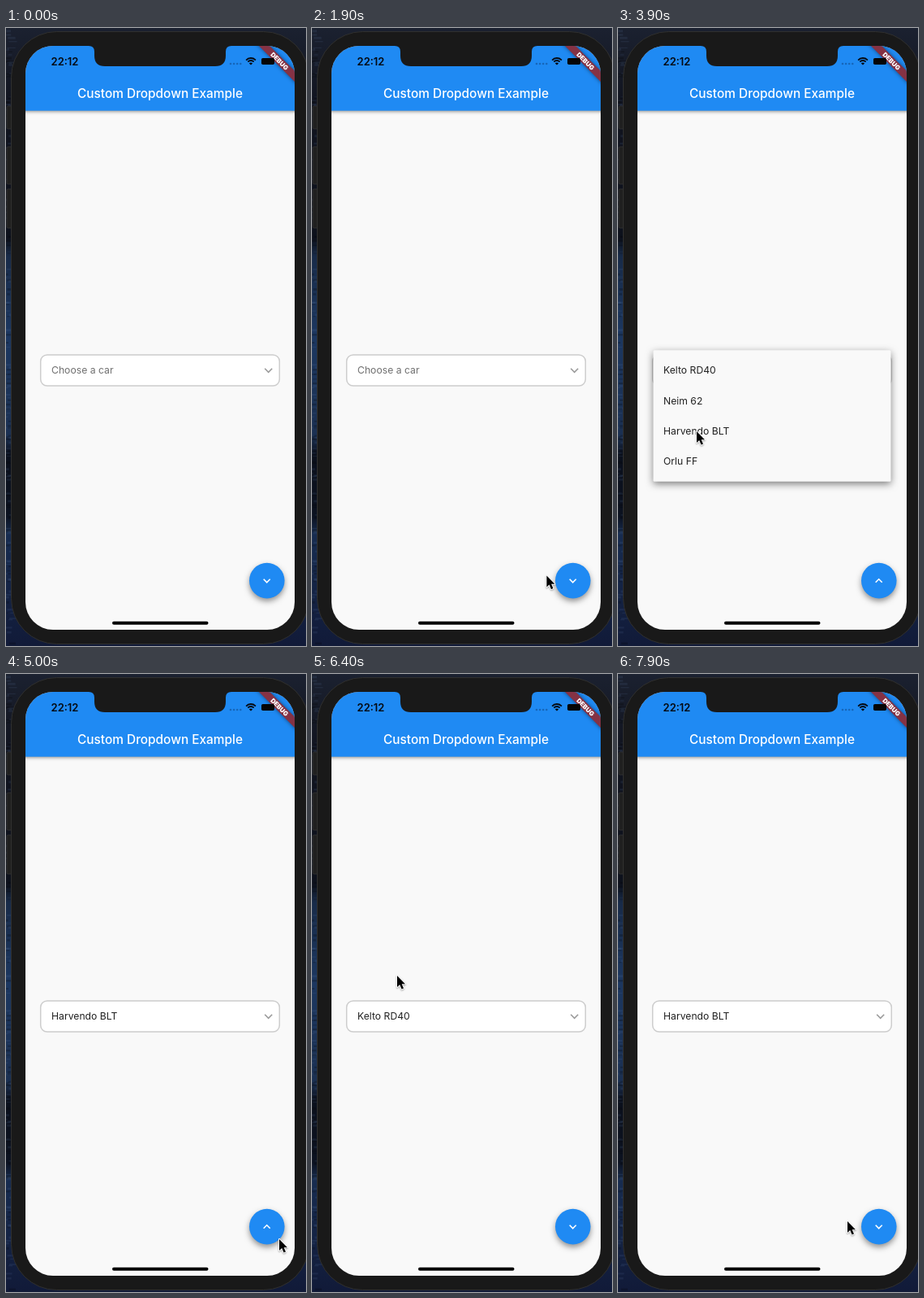
Write an HTML page with a canvas that moves like this. It is 370x760 px and loops after 8000 ms.

```html
<!DOCTYPE html>
<html lang="en">
<head>
<meta charset="utf-8">
<title>Custom Dropdown Example</title>
<style>
  html, body { margin: 0; width: 100%; height: 100%; overflow: hidden; background: #111827; }
  canvas { display: block; width: 370px; height: 760px; }
</style>
</head>
<body>
<canvas id="stage"></canvas>
<script>
const canvas = document.getElementById('stage');
const scale = window.devicePixelRatio || 1;
canvas.width = 370 * scale;
canvas.height = 760 * scale;
const c = canvas.getContext('2d');
c.scale(scale, scale);

const LOOP = 8000, STEP = 100;
const BLUE = '#1f8af3', PAGE = '#f9f9f9';
const ITEMS = ['Kelto RD40', 'Neim 62', 'Harvendo BLT', 'Orlu FF'];
const ROW = 37.3, PAD = 6.2, FIELD_Y = 421;

// Each menu: opening time, closing time, preselected row, chosen row.
const MENUS = [
  { open: 2220, close: 4020, from: 0, pick: 2 },
  { open: 5280, close: 6220, from: 2, pick: 0 },
  { open: 6720, close: 7520, from: 0, pick: 2 }
];
const FAB_CLICKS = [2200, 5260];

// Pointer tip: time, x, y.
const PATH = [
  [500, -12, 600], [900, 262, 670], [1100, 270, 671], [1800, 272, 671],
  [2150, 333, 680], [2800, 333, 680], [3100, 331, 683], [3300, 326, 680],
  [3700, 110, 500], [3900, 97, 496], [4200, 97, 496], [4500, 92, 508],
  [4800, 110, 516], [5000, 337, 695], [5100, 346, 698], [5250, 335, 688],
  [5700, 334, 686], [6100, 108, 352], [6250, 105, 352], [6400, 105, 371],
  [6650, 108, 416], [6800, 108, 418], [7200, 100, 492], [7600, 99, 495],
  [7900, 283, 673], [8000, 283, 673]
];

const clamp = v => Math.max(0, Math.min(1, v));
const lerp = (a, b, k) => a + (b - a) * k;

function box(x, y, w, h, r, fill, stroke, line = 1) {
  c.beginPath();
  c.roundRect(x, y, w, h, r);
  if (fill) { c.fillStyle = fill; c.fill(); }
  if (stroke) { c.strokeStyle = stroke; c.lineWidth = line; c.stroke(); }
}

function text(str, x, y, size, color, weight = 400, align = 'left') {
  c.font = `${weight} ${size}px Inter, sans-serif`;
  c.textAlign = align;
  c.textBaseline = 'alphabetic';
  c.fillStyle = color;
  c.fillText(str, x, y + size * 0.36);
}

function shadow(color, blur, dy) {
  c.shadowColor = color;
  c.shadowBlur = blur * scale;
  c.shadowOffsetY = dy * scale;
}

function chevron(x, y, w, color, up) {
  const d = up ? -w / 4 : w / 4;
  c.beginPath();
  c.moveTo(x - w / 2, y - d);
  c.lineTo(x, y + d);
  c.lineTo(x + w / 2, y - d);
  c.strokeStyle = color;
  c.lineWidth = 1.6;
  c.stroke();
}

function wallpaper() {
  const g = c.createLinearGradient(0, 0, 0, 760);
  [[0, '#1b2130'], [0.12, '#11141f'], [0.34, '#0d111c'], [0.37, '#182b49'], [0.5, '#1c3760'],
   [0.66, '#1b3052'], [0.69, '#0b101c'], [0.79, '#0c1220'], [0.82, '#172c50'], [1, '#111a38']]
    .forEach(([at, color]) => g.addColorStop(at, color));
  c.fillStyle = g;
  c.fillRect(0, 0, 370, 760);
  let seed = 7;
  const rnd = () => (seed = seed * 16807 % 2147483647) / 2147483647;
  for (let i = 0; i < 170; i++) {
    c.fillStyle = rnd() < 0.5 ? 'rgba(0,0,0,.22)' : 'rgba(95,125,170,.13)';
    c.fillRect(rnd() * 8 - 4, rnd() * 760, 3 + rnd() * 8, 1 + rnd() * 2);
  }
}

function screenPath() {
  c.beginPath();
  c.roundRect(24, 22, 332, 718, 34);
}

function ribbon() {
  c.save();
  c.translate(356, 22);
  c.rotate(Math.PI / 4);
  shadow('rgba(0,0,0,.5)', 5, 0);
  c.fillStyle = '#853244';
  c.fillRect(-60, 21.8, 120, 9.3);
  shadow('transparent', 0, 0);
  text('DEBUG', 0, 26.5, 7.8, '#fff', 900, 'center');
  c.restore();
}

function statusIcons() {
  text('22:12', 72.5, 41, 13, '#050a12', 600, 'center');
  c.fillStyle = 'rgba(0,20,50,.3)';
  for (let i = 0; i < 4; i++) {
    c.beginPath();
    c.arc(277 + i * 4.1, 44, 1.3, 0, 7);
    c.fill();
  }
  c.strokeStyle = '#050a12';
  c.lineWidth = 1.8;
  for (const r of [8, 5]) {
    c.beginPath();
    c.arc(302, 45, r, -Math.PI * 0.76, -Math.PI * 0.24);
    c.stroke();
  }
  c.beginPath();
  c.moveTo(302, 45.6);
  c.arc(302, 45.6, 3, -Math.PI * 0.76, -Math.PI * 0.24);
  c.fillStyle = '#050a12';
  c.fill();
  box(315, 37, 16, 8, 1.8, '#050505');
}

function notch() {
  c.beginPath();
  c.moveTo(102, 21);
  c.lineTo(102, 22);
  c.quadraticCurveTo(109, 22, 109, 29);
  c.lineTo(109, 34);
  c.quadraticCurveTo(109, 47, 122, 47);
  c.lineTo(258, 47);
  c.quadraticCurveTo(271, 47, 271, 34);
  c.lineTo(271, 29);
  c.quadraticCurveTo(271, 22, 278, 22);
  c.lineTo(278, 21);
  c.fillStyle = '#191919';
  c.fill();
}

function phone() {
  wallpaper();
  for (const [y, h] of [[96, 28], [146, 46], [198, 48]]) box(1, y, 12, h, 1.5, '#202020', '#343434', 0.8);
  box(6.5, 4.5, 367, 753, 56, '#191919', '#30302f');
  c.save();
  screenPath();
  c.fillStyle = PAGE;
  c.fill();
  c.clip();
  shadow('rgba(0,0,0,.4)', 4, 1.5);
  c.fillStyle = BLUE;
  c.fillRect(10, 10, 360, 91.7);
  shadow('transparent', 0, 0);
  text('Custom Dropdown Example', 190, 80, 15.4, '#fff', 500, 'center');
  ribbon();
  statusIcons();
  c.restore();
  notch();
  box(131, 729.7, 118.5, 4, 2, '#000');
}

function field(t) {
  box(42.7, 402, 294.6, 38, 8, '#fff', '#cdcdcd', 1.5);
  const done = MENUS.filter(m => t >= m.close).pop();
  text(done ? ITEMS[done.pick] : 'Choose a car', 56, FIELD_Y, 12.2, done ? '#222' : '#707070');
  chevron(323.7, FIELD_Y, 9, '#9b9b9b', false);
}

function menu(t, m) {
  const p = clamp((t - m.open) / 300);
  const alpha = Math.min(clamp(p / 0.25), clamp(1 - (t - m.close) / 75));
  if (t < m.open || alpha <= 0) return;
  const grow = clamp((p - 0.25) / 0.25);
  const full = ITEMS.length * ROW + PAD * 2;
  const top = FIELD_Y - ROW / 2 - PAD - m.from * ROW;
  const y0 = lerp(m.from * ROW + PAD, 0, grow);
  const y1 = lerp((m.from + 1) * ROW + PAD, full, grow);
  c.globalAlpha = alpha;
  shadow('rgba(0,0,0,.5)', 10, 3);
  box(43.5, top + y0, 293, y1 - y0, 1.5, PAGE);
  shadow('transparent', 0, 0);
  const unit = 0.5 / (ITEMS.length + 1.5);
  ITEMS.forEach((name, i) => {
    const fade = i === m.from ? 1 : clamp((p - 0.5 - (i + 1) * unit) / (1.5 * unit));
    c.globalAlpha = alpha * fade;
    text(name, 56, top + PAD + (i + 0.5) * ROW, 12.2, '#222');
  });
  c.globalAlpha = 1;
}

function fab(t) {
  shadow('rgba(0,0,0,.42)', 7, 3.5);
  c.beginPath();
  c.arc(321.8, 679.6, 21.8, 0, 7);
  c.fillStyle = BLUE;
  c.fill();
  shadow('transparent', 0, 0);
  const up = FAB_CLICKS.filter(at => t >= at).length % 2 === 1;
  chevron(321.7, 679.8, 8, '#fff', up);
}

function pointer(t) {
  const i = PATH.findIndex(p => p[0] > t);
  if (i < 1) return;
  const [ta, xa, ya] = PATH[i - 1], [tb, xb, yb] = PATH[i];
  const k = (t - ta) / (tb - ta);
  c.save();
  c.translate(lerp(xa, xb, k), lerp(ya, yb, k));
  const arrow = new Path2D('M0 0V14L3.2 11L5.6 16.6L8 15.5L5.7 10.2H10Z');
  shadow('rgba(0,0,0,.35)', 2, 1);
  c.lineJoin = 'round';
  c.strokeStyle = '#fff';
  c.lineWidth = 1.8;
  c.stroke(arrow);
  shadow('transparent', 0, 0);
  c.fillStyle = '#000';
  c.fill(arrow);
  c.restore();
}

function draw() {
  const t = Math.floor(performance.now() % LOOP / STEP) * STEP;
  phone();
  field(t);
  fab(t);
  MENUS.forEach(m => menu(t, m));
  pointer(t);
  requestAnimationFrame(draw);
}
draw();
</script>
</body>
</html>
```
